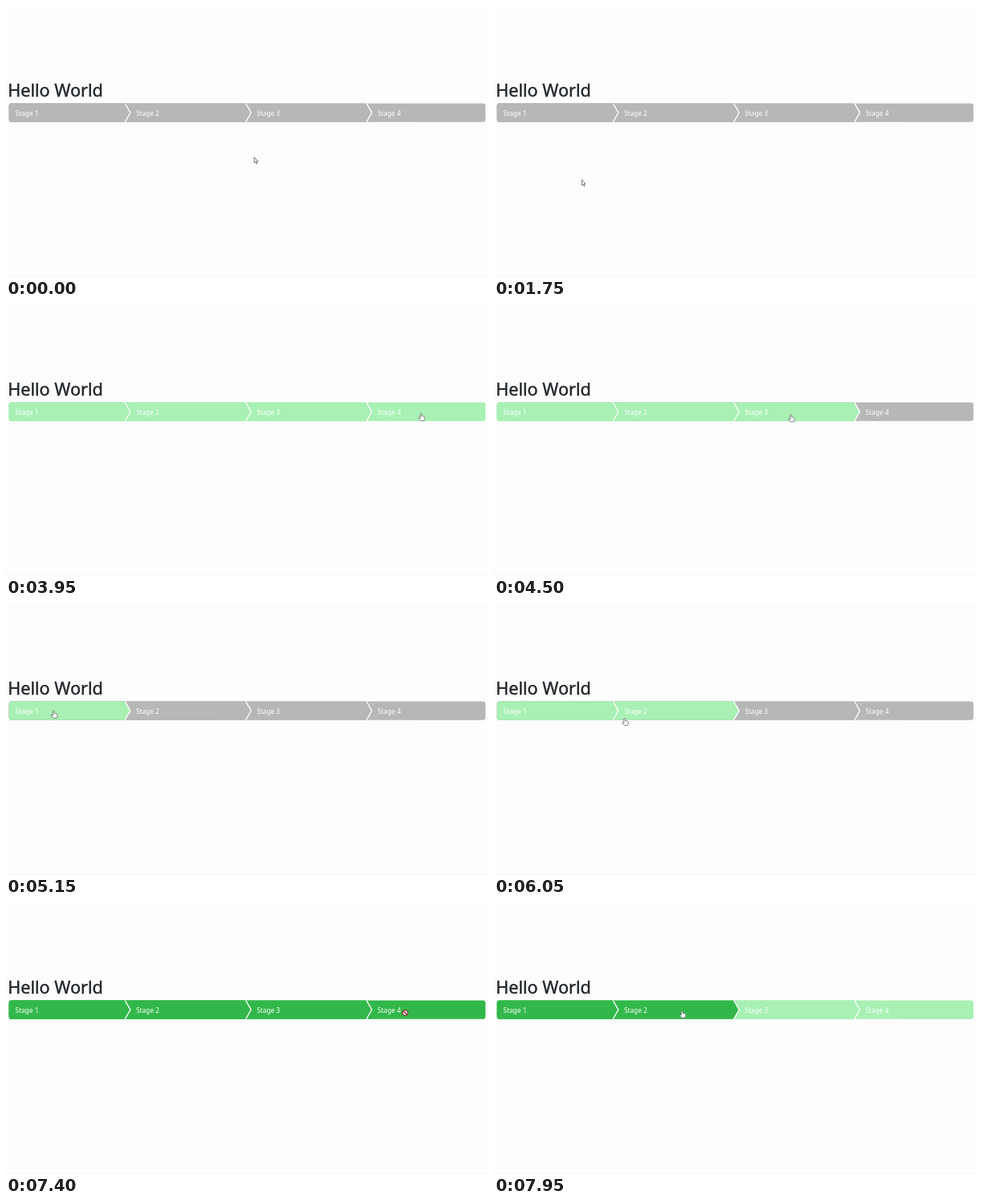
Write an HTML page that moves like this. It is 600 px wide and 338 px high and loops after 8 s.

```html
<!DOCTYPE html>
<html lang="en">
<head>
<meta charset="utf-8">
<title>Stage picker</title>
<style>
  html, body { margin: 0; width: 100%; height: 100%; overflow: hidden; background: #fdfdfd; }
  svg { display: block; width: 600px; height: 338px; }
  text { font-family: "Noto Sans", "Open Sans", sans-serif; }
  .title { font-size: 21.6px; fill: #212529; stroke: #212529; stroke-width: .4; }
  .label { font-size: 8.3px; fill: #fff; }
  .pointer { fill: #fff; stroke: #55555a; stroke-width: .8; stroke-linejoin: round; }
</style>
</head>
<body>
<svg viewBox="0 0 600 338">
  <defs>
    <clipPath id="bar"><rect x="3.7" y="121.5" width="593.1" height="23.2" rx="3"/></clipPath>
  </defs>
  <rect y="337" width="600" height="1" fill="#f7f7f7"/>
  <text class="title" x="2.3" y="112.5">Hello World</text>
  <g id="stages" clip-path="url(#bar)"></g>
  <g id="cursor">
    <path id="arrow" class="pointer" d="M0 0V7.2L1.6 5.7L2.8 8.3L3.8 7.8L2.7 5.3H4.8Z"/>
    <path id="hand" class="pointer" transform="translate(.6 -.3) scale(.9)"
      d="M-1 1Q-1 0 0 0T1 1V3.6Q2 3 2.6 4Q3.6 3.6 4.1 4.5Q5.2 4.4 5.2 5.6V7.2L4.2 10H-.6L-3.3 6.6Q-3.6 5.3-2.4 5.5L-1 6.6Z"/>
    <g id="forbidden" fill="#fff" stroke="#8c2a2c" stroke-width="1.3">
      <circle r="3.3"/>
      <path d="M-2.3-2.3L2.3 2.3"/>
    </g>
  </g>
</svg>
<script>
const LOOP = 8000, STEP = 50;
const TOP = 121.5, BOTTOM = 144.7, MIDDLE = 133.1, SLANT = 7.2;
const STAGES = 4, PITCH = 150.3, FIRST_EDGE = 147.6;
const GREY = '#b8b7b8', LIGHT = '#a8f0b4', DARK = '#32b84a';

// Where the pointer turns or rests: time, x, y, clicks on arrival
const TURNS = [
  [100, 309, 188.5], [250, 313, 190.5], [500, 313, 190.5],
  [1300, 265, 224], [2050, 27, 162], [2300, 45, 138],
  [2800, 241, 133.5], [3250, 33, 134], [4150, 580, 137],
  [4980, 22, 133.5], [5700, 301, 143], [6400, 23, 135, true],
  [6850, 349.5, 138.5, true], [6950, 349.5, 138.5],
  [7150, 510, 137, true], [7350, 510, 137],
  [7750, 166, 134.5], [8150, 301, 134.5]
];

const byId = id => document.getElementById(id);
const edge = i => FIRST_EDGE + (i - 1) * PITCH;
const side = x => `${x},${TOP - 1} ${x + SLANT},${MIDDLE} ${x},${BOTTOM + 1}`;

function add(parent, tag, attrs, content = '') {
  const node = document.createElementNS('http://www.w3.org/2000/svg', tag);
  for (const key in attrs) node.setAttribute(key, attrs[key]);
  node.textContent = content;
  return parent.appendChild(node);
}

const group = byId('stages');
// Later stages lie underneath, so each one shows its pointed right end.
const fills = [];
for (let i = STAGES; i >= 1; i--) {
  fills[i - 1] = add(group, 'polygon', { points: `0,${TOP - 1} ${side(edge(i + 1))} 0,${BOTTOM + 1}` });
  fills[i - 1].setAttribute('points', `0,${TOP - 1} ${side(edge(i))} 0,${BOTTOM + 1}`);
}
for (let i = 0; i < STAGES; i++) {
  if (i) add(group, 'polyline', {
    points: side(edge(i)), fill: 'none', stroke: '#fff', 'stroke-width': 1.3
  });
  add(group, 'text', { class: 'label', x: 11.6 + i * PITCH, y: 136.6 }, `Stage ${i + 1}`);
}

// Eased sideways sweep; height changes late in each sweep
function pointerAt(t) {
  const next = Math.max(1, TURNS.findIndex(turn => turn[0] > t));
  const [t0, x0, y0] = TURNS[next - 1], [t1, x1, y1] = TURNS[next];
  const u = Math.max(0, (t - t0) / (t1 - t0));
  const sweep = (1 - Math.cos(Math.PI * u)) / 2;
  return [x0 + (x1 - x0) * sweep, y0 + (y1 - y0) * sweep ** 5];
}

function stageUnder(x, y) {
  if (y < TOP || y > BOTTOM) return 0;
  const shift = SLANT * (1 - Math.abs(y - MIDDLE) / (BOTTOM - MIDDLE));
  return Math.max(1, Math.ceil((x - shift - FIRST_EDGE) / PITCH) + 1);
}

function draw(now) {
  const t = Math.floor(now % LOOP / STEP) * STEP;
  const [x, y] = pointerAt(t);
  const hovered = stageUnder(x, y);
  const selected = TURNS.reduce((stage, [time, cx, cy, clicks]) =>
    clicks && t >= time ? stageUnder(cx, cy) : stage, 0);
  const preview = hovered || selected;

  fills.forEach((fill, i) => {
    const color = i < Math.min(selected, preview) ? DARK
      : i < Math.max(selected, preview) ? LIGHT : GREY;
    fill.setAttribute('fill', color);
  });

  const shape = !hovered ? 'arrow' : hovered === selected ? 'forbidden' : 'hand';
  for (const id of ['arrow', 'hand', 'forbidden']) {
    byId(id).style.display = id === shape ? '' : 'none';
  }
  byId('cursor').setAttribute('transform', `translate(${x} ${y})`);
}

const start = performance.now();
function tick() {
  draw(performance.now() - start);
  requestAnimationFrame(tick);
}
tick();
</script>
</body>
</html>
```
